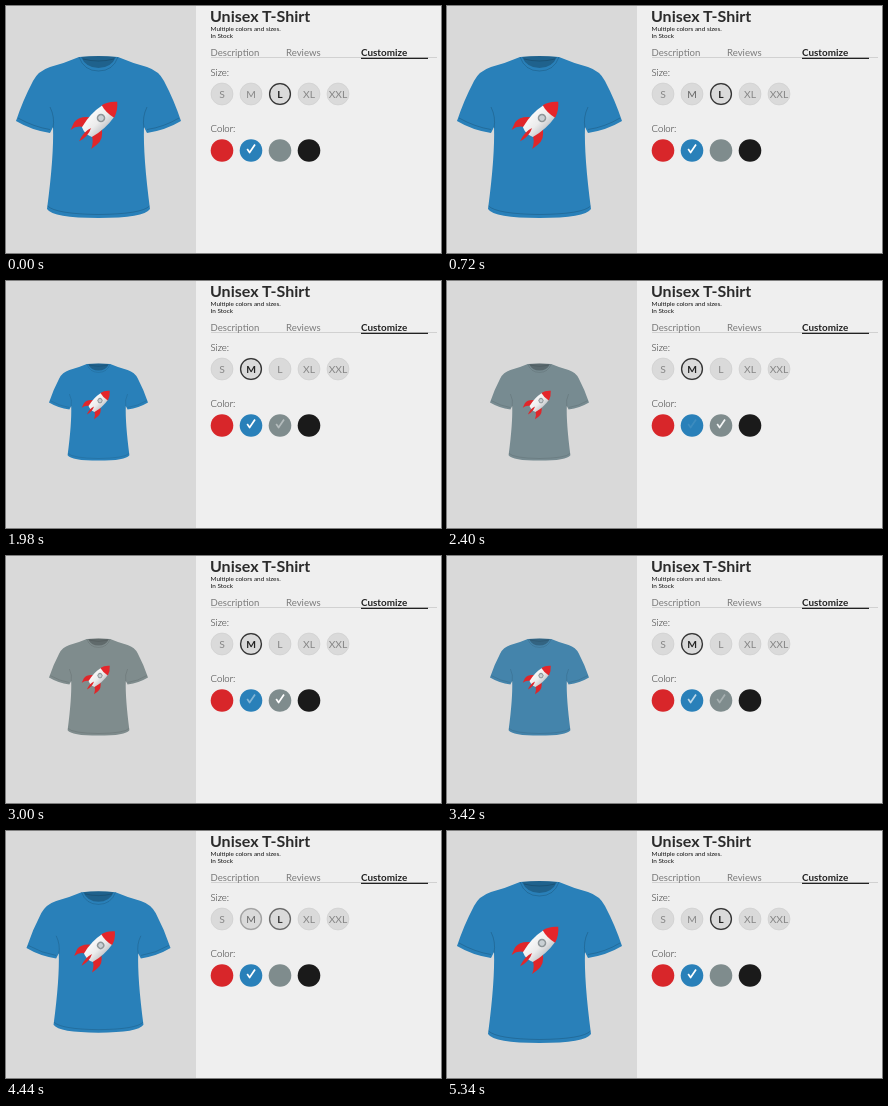
An HTML page that plays this animation: 435 by 247 pixels, repeating every 6240 ms.

```html
<!DOCTYPE html>
<html lang="en">
<head>
<meta charset="utf-8">
<title>Unisex T-Shirt</title>
<style>
  html, body { margin: 0; width: 100%; height: 100%; overflow: hidden; background: #efefef; }
  svg { display: block; width: 100%; height: 100%; }
  text { font-family: Lato, "Open Sans", sans-serif; font-size: 9.6px; fill: #333; }
  .title { font-size: 16px; font-weight: 700; fill: #2b2b2b; }
  .note { font-size: 6.4px; fill: #111; }
  .tab { fill: #7b7b7b; }
  .tab.on { font-size: 9.9px; font-weight: 700; fill: #222; }
  .label { font-weight: 300; fill: #222; }
  .size text { font-size: 10.3px; text-anchor: middle; }
  .ring { fill: none; stroke: #333; stroke-width: 1.3; }
  .tick { fill: none; stroke: #fff; stroke-width: 1.7; stroke-linejoin: round; }
  .fold { fill: none; stroke: #000; stroke-opacity: .16; stroke-width: 1; }
</style>
</head>
<body>
<svg viewBox="0 0 435 247">
  <defs>
    <linearGradient id="hull">
      <stop offset="0" stop-color="#f8f8f8"/>
      <stop offset=".55" stop-color="#ececec"/>
      <stop offset="1" stop-color="#c9cccf"/>
    </linearGradient>
  </defs>
  <rect width="435" height="247" fill="#efefef"/>
  <rect width="190" height="247" fill="#d9d9d9"/>

  <g id="shirt">
    <path id="cloth" d="M73 51 Q92.500 49 112 51 Q126 57 141 61 Q153 65 158 75
      Q168 94 175 115 Q160 124 141 127 L138 121 Q137 150 144 203
      Q138 212 92.500 212 Q47 212 41 203 Q48 150 47 121 L44 127
      Q25 124 10 115 Q17 94 27 75 Q32 65 44 61 Q59 57 73 51Z"/>
    <path d="M75 51 Q92.500 49 110 51 Q105 62 92.500 62 Q80 62 75 51Z" fill="#000" fill-opacity=".24"/>
    <path class="fold" d="M73 51 Q78 65 92.500 65 Q107 65 112 51 M77 53 Q92.500 57 108 53"/>
    <path class="fold" d="M47 122 Q49 111 44 101 M138 122 Q136 111 141 101
      M41.500 200 Q50 208 92.500 208.500 Q136 208 143.500 200
      M12 112 Q28 121 44 123.500 M173 112 Q158 121 141 123.500"/>
    <g transform="translate(95 112) rotate(45)">
      <path d="M-8 7 Q-17 14 -16 22 L-13 30 Q-12 22 -6 19Z M8 7 Q17 13 16 22 L15 29 Q12 22 6 19Z" fill="#e0262a"/>
      <path d="M-8 -10 Q-11 4 -7 20 Q0 23 7 20 Q11 4 8.500 -10Z" fill="url(#hull)"/>
      <path d="M0 -23 Q7 -17 9 -9.500 Q0 -7 -8.500 -9.500 Q-7 -17 0 -23Z" fill="#e5252a"/>
      <path d="M0 14 Q4 22 1 32 Q-3 22 0 14Z" fill="#e0262a"/>
      <circle r="3.500" fill="#c9d0d4" stroke="#8e9699" stroke-width="1.600"/>
    </g>
  </g>

  <text class="title" x="204" y="16">Unisex T-Shirt</text>
  <text class="note" x="204.500" y="25">Multiple colors and sizes.</text>
  <text class="note" x="204.500" y="32">In Stock</text>
  <path d="M205 51.500H431" stroke="#c9c9c9" stroke-width=".8"/>
  <path d="M355 52.400H422" stroke="#222" stroke-width="1.300"/>
  <text class="tab" x="204.500" y="50">Description</text>
  <text class="tab" x="280" y="50">Reviews</text>
  <text class="tab on" x="355" y="50">Customize</text>
  <text class="label" x="204.500" y="70">Size:</text>
  <text class="label" x="204.500" y="126">Color:</text>
  <g id="sizes"></g>
  <g id="colors"></g>
</svg>
<script>
  const LOOP = 6240, STEP = 60, FADE = 500, LEAD = 140;
  const BLUE = [41, 128, 185], GREY = [127, 140, 141];
  const $ = id => document.getElementById(id);
  const clamp = v => Math.min(1, Math.max(0, v));
  const mix = (a, b, k) => a + (b - a) * k;
  const rgb = c => `rgb(${c.map(Math.round)})`;
  const at = i => 216 + 29 * i;

  $('sizes').innerHTML = ['S', 'M', 'L', 'XL', 'XXL'].map((name, i) =>
    `<g class="size" transform="translate(${at(i)} 88)">
      <circle r="11" fill="#dadada" stroke="#cccccc" stroke-width=".6"/>
      <circle class="ring" r="10.4" opacity="0"/>
      <text y="3.500" fill="#868686">${name}</text></g>`).join('');

  $('colors').innerHTML = ['#d8262a', rgb(BLUE), rgb(GREY), '#1a1a1a'].map((fill, i) =>
    `<g transform="translate(${at(i)} 144.500)">
      <circle r="11.3" fill="${fill}"/>
      <path class="tick" d="M-3.800 -1.500L-1.400 2L4 -6" opacity="0"/></g>`).join('');

  const sizes = [...document.querySelectorAll('.size')];
  const ticks = document.querySelectorAll('.tick');

  // The CSS "ease" curve, cubic-bezier(.25, .1, .25, 1)
  function ease(x) {
    if (x <= 0 || x >= 1) return clamp(x);
    const curve = (a, b, u) => 3 * a * u * (1 - u) ** 2 + 3 * b * u * u * (1 - u) + u ** 3;
    let lo = 0, hi = 1;
    for (let i = 0; i < 24; i++) {
      const u = (lo + hi) / 2;
      if (curve(.25, .25, u) < x) lo = u; else hi = u;
    }
    return curve(.1, 1, lo);
  }

  // Clicks become visible a little late, with the fade already under way
  const click = (t, start) => t < start ? 0 : ease((t - start + LEAD) / FADE);
  const hover = (t, start, end) => clamp((t - start + STEP) / (end - start + STEP));

  function setSize(el, on, over) {
    const label = el.querySelector('text');
    const shade = Math.round(mix(134 - 34 * over, 34, on));
    el.querySelector('.ring').setAttribute('opacity', on);
    label.style.fill = rgb([shade, shade, shade]);
  }

  function draw(now) {
    const t = Math.floor(now % LOOP / STEP) * STEP;
    const medium = click(t, 1200) - click(t, 4380);
    const grey = click(t, 2220) - click(t, 3360);
    const isMedium = t >= 1200 && t < 4380;

    $('shirt').setAttribute('transform',
      `translate(92.5 131) scale(${1 - .4 * medium}) translate(-92.5 -131)`);
    $('cloth').setAttribute('fill', rgb(BLUE.map((c, i) => mix(c, GREY[i], grey))));

    sizes.forEach((el, i) => {
      el.querySelector('text').style.fontWeight = i === (isMedium ? 1 : 2) ? 700 : 400;
      el.querySelector('text').style.fill = '#868686';
    });
    setSize(sizes[1], medium, hover(t, 480, 720) - hover(t, 1740, 1980));
    setSize(sizes[2], 1 - medium, hover(t, 3900, 4140) - hover(t, 5220, 5340));

    const overGrey = hover(t, 1740, 1980) - hover(t, 2640, 2760);
    const overBlue = hover(t, 2820, 3000) - hover(t, 3780, 3900);
    ticks[1].setAttribute('opacity', Math.max(1 - grey, .42 * overBlue));
    ticks[2].setAttribute('opacity', Math.max(grey, .42 * overGrey));
  }

  const origin = performance.now();
  function frame() {
    draw(performance.now() - origin);
    requestAnimationFrame(frame);
  }
  frame();
</script>
</body>
</html>
```
